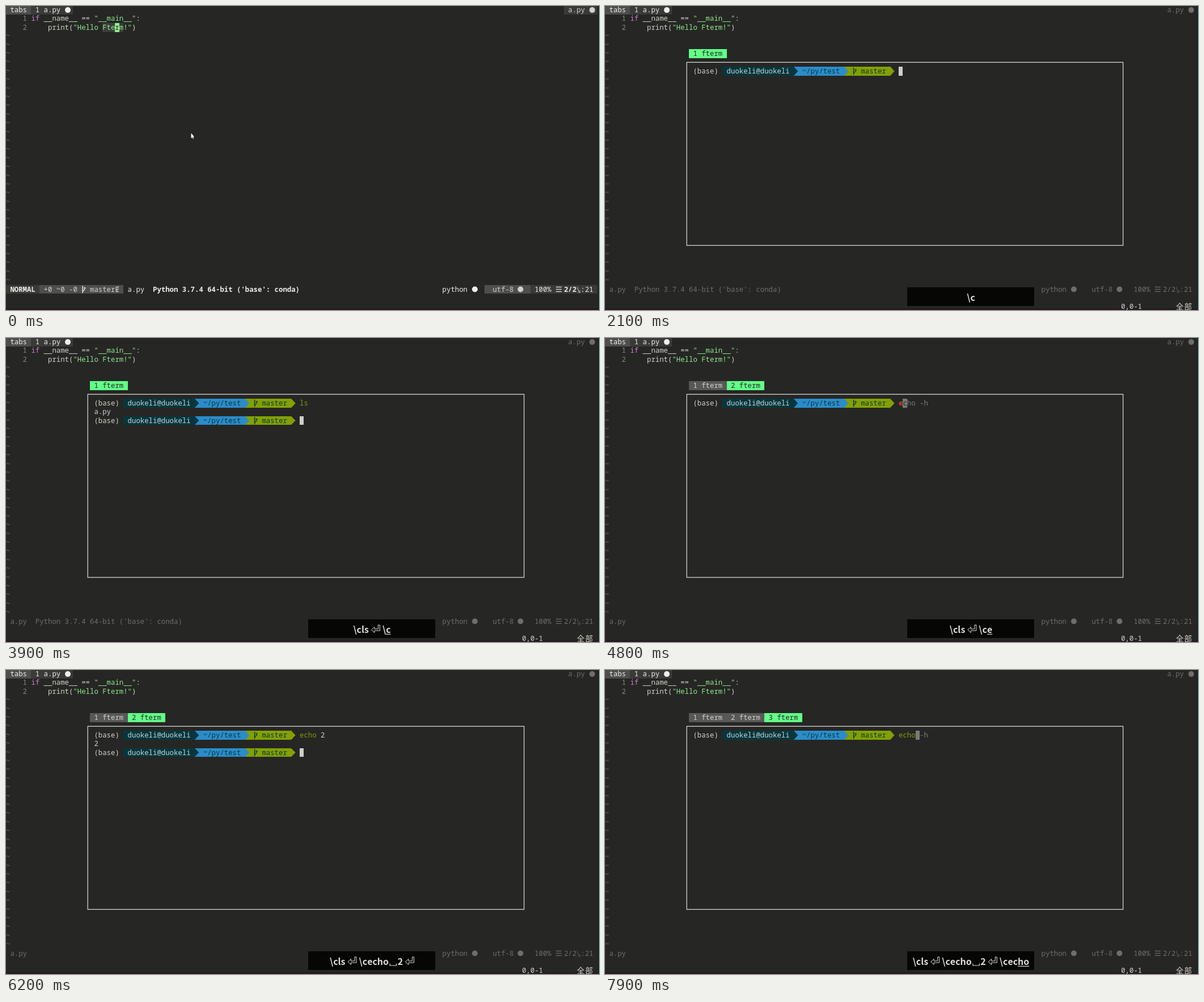
Recreate the animation shown at these times as an HTML page with a canvas. Size 1046 px wide and 536 px high, loop 8 s.

```html
<!DOCTYPE html>
<html lang="en">
<head>
<meta charset="utf-8">
<title>Floating terminal</title>
<style>
html, body { margin: 0; width: 100%; height: 100%; overflow: hidden; background: #262624; }
canvas { display: block; }
</style>
</head>
<body>
<canvas id="stage" width="1046" height="536"></canvas>
<script>
const ctx = document.getElementById('stage').getContext('2d');
const LOOP = 8000, CW = 7.4, RH = 15.39;
const MONO = '"Noto Sans Mono", "DejaVu Sans Mono", monospace';
const SANS = '"Noto Sans CJK SC", "Noto Sans", sans-serif';
const USER = 'duokeli@duokeli';
const C = {
  bg: '#262624', fg: '#d2d2cc', dim: '#6e6e6b', white: '#eeeeea', seg: '#3a3a39', segHi: '#4e4e4d',
  green: '#8fe88f', purple: '#c084c8', teal: '#07363e', blue: '#2b8cc9', lime: '#83a000',
  red: '#d8452f', tab: '#62ff87', tabOff: '#585857', hint: '#7a7a77'
};

// Font size at which one glyph advances exactly one cell
ctx.font = `100px ${MONO}`;
const SIZE = 100 * CW / ctx.measureText('M').width;

const X = col => col * CW;
const Y = row => row * RH - 0.5;

function rect(x, y, w, h, color) {
  ctx.fillStyle = color;
  ctx.fillRect(x, y, w, h);
}
function cells(col, row, count, color) {
  const x = Math.round(X(col)), y = Math.round(Y(row));
  rect(x, y, Math.round(X(col + count)) - x, Math.round(Y(row + 1)) - y, color);
}
function text(col, row, str, color, bold) {
  ctx.font = `${bold ? 'bold ' : ''}${SIZE}px ${MONO}`;
  ctx.fillStyle = color;
  [...str].forEach((ch, i) => ch !== ' ' && ctx.fillText(ch, X(col + i), Y(row) + 11.6));
}
function dot(x, row, color) {
  ctx.fillStyle = color;
  ctx.beginPath();
  ctx.arc(x, Y(row) + 7.6, 5, 0, 7);
  ctx.fill();
}
function line(points, color, width = 1, close = false) {
  ctx.strokeStyle = color;
  ctx.lineWidth = width;
  ctx.beginPath();
  points.forEach(([x, y]) => ctx.lineTo(x, y));
  if (close) ctx.closePath();
  ctx.stroke();
}
function arrow(col, row, color) {
  const x = X(col), y = Math.round(Y(row)), h = Math.round(Y(row + 1)) - y;
  ctx.fillStyle = color;
  ctx.beginPath();
  ctx.moveTo(x - 0.5, y);
  ctx.lineTo(x, y);
  ctx.lineTo(x + CW, y + h / 2);
  ctx.lineTo(x, y + h);
  ctx.lineTo(x - 0.5, y + h);
  ctx.fill();
}
function branch(col, row, color) {
  const x = X(col), y = Y(row);
  line([[x + 2, y + 1.5], [x + 2, y + 14]], color, 1.5);
  line([[x + 2, y + 11], [x + 5.6, y + 8], [x + 5.6, y + 4]], color, 1.3);
  line([[x + 3.8, y + 6], [x + 5.6, y + 3.8], [x + 7.2, y + 6]], color);
}

// Shell rows: a string is plain output, an object is a prompt with its command
const LS = { cmd: 'ls', ok: true };
const ECHO = { cmd: 'echo', ok: true, arg: ' 2' };
const typed = (cmd, hint, ok) => [{ cmd, hint, ok }];
const CAST = '\\cls⏎', CAST2 = CAST + '\\cecho␣2⏎';

const steps = [
  [0, { cursor: true, pointer: true, mark: true, showcmd: '', keys: '', under: 0, tabs: 0, term: [] }],
  [300, { cursor: false }],
  [500, { cursor: true, pointer: false, showcmd: '\\' }],
  [600, { keys: '\\', under: 1, showcmd: '\\c' }],
  [700, { keys: '\\c' }],
  [900, { under: 0 }],
  [1200, { cursor: false }],
  [1600, { showcmd: '' }],
  [1700, { tabs: 1, cursor: true, term: [''] }],
  [2000, { term: typed('') }],
  [2100, { mark: false }],
  [2300, { cursor: false }],
  [2500, { cursor: true, term: typed('l', 's') }],
  [2600, { keys: '\\cl', under: 1 }],
  [2700, { term: [LS] }],
  [2800, { keys: '\\cls', under: 2 }],
  [2900, { term: [LS, 'a.py', { cmd: '' }] }],
  [3000, { keys: CAST, under: 1 }],
  [3100, { under: 0 }],
  [3500, { cursor: false }],
  [3600, { keys: CAST + '\\', under: 1 }],
  [3800, { cursor: true }],
  [3900, { keys: CAST + '\\c' }],
  [4100, { tabs: 2, term: [''], under: 0 }],
  [4300, { term: typed('') }],
  [4500, { cursor: false }],
  [4800, { cursor: true, term: typed('e', 'cho -h'), keys: CAST + '\\ce', under: 1 }],
  [5000, { term: typed('ec', 'ho -h'), keys: CAST + '\\cec', under: 2 }],
  [5100, { term: typed('ech', 'o -h'), keys: CAST + '\\cech' }],
  [5200, { term: typed('echo', ' -h', true), keys: CAST + '\\cecho␣', under: 3 }],
  [5300, { under: 0 }],
  [5500, { term: typed('echo ', '-h', true) }],
  [5700, { term: [ECHO] }],
  [5800, { keys: CAST + '\\cecho␣2', under: 1 }],
  [6000, { term: [ECHO, '2', { cmd: '' }] }],
  [6100, { keys: CAST2 }],
  [6200, { under: 0 }],
  [6500, { keys: CAST2 + '\\', under: 1 }],
  [6600, { cursor: false }],
  [6700, { keys: CAST2 + '\\c' }],
  [7000, { tabs: 3, term: [''], cursor: true, under: 0 }],
  [7100, { term: typed('') }],
  [7400, { term: typed('e', 'cho -h') }],
  [7500, { keys: CAST2 + '\\ce', under: 1 }],
  [7600, { term: typed('ec', 'ho -h') }],
  [7700, { term: typed('ech', 'o -h'), keys: CAST2 + '\\cec', under: 2 }],
  [7800, { term: typed('echo', ' -h', true), keys: CAST2 + '\\cech' }],
  [7900, { keys: CAST2 + '\\cecho' }]
];
const stateAt = t => Object.assign({}, ...steps.filter(s => s[0] <= t).map(s => s[1]));

function drawEditor(s) {
  const active = !s.tabs;
  cells(0, 0, 6, C.segHi);
  cells(6, 0, 10, C.seg);
  text(1, 0, 'tabs', C.white);
  text(7, 0, '1 a.py', C.white);
  dot(109, 0, C.white);
  if (active) cells(133, 0, 8, C.seg);
  const side = active ? C.fg : C.dim;
  text(134, 0, 'a.py', side);
  dot(1034, 0, side);

  text(4, 1, '1', '#858580');
  text(4, 2, '2', '#858580');
  text(6, 1, 'if', C.purple);
  text(9, 1, '__name__ ==', C.fg);
  text(21, 1, '"__main__"', C.green);
  text(31, 1, ':', C.fg);
  if (s.mark) cells(23, 2, 5, '#3b3e3a');
  text(10, 2, 'print(', C.fg);
  text(16, 2, '"Hello Fterm!"', C.green);
  text(30, 2, ')', C.fg);
  if (active && s.cursor) {
    cells(26, 2, 1, '#8cf08c');
    text(26, 2, 'r', C.bg);
  }
  for (let row = 3; row < 32; row++) text(0, row, '~', '#66706c');
}

function drawStatus(s) {
  const row = 32, active = !s.tabs, fg = active ? C.white : C.dim;
  const env = "Python 3.7.4 64-bit ('base': conda)";
  if (active) {
    cells(0, row, 8, C.seg);
    cells(8, row, 20, C.segHi);
    cells(114, row, 11, C.segHi);
    cells(125, row, 16, C.seg);
    text(1, row, 'NORMAL', fg, true);
    text(9, row, '+0 ~0 -0', C.fg);
    branch(18, row, C.white);
    text(20, row, 'masterɆ', C.fg);
    text(29, row, 'a.py', fg);
    text(35, row, env, fg, true);
  } else {
    text(1, row, 'a.py', fg);
    if (s.tabs === 1) text(7, row, env, fg);
  }
  text(104, row, 'python', fg);
  dot(827, row, fg);
  text(116, row, 'utf-8', active ? C.fg : C.dim);
  dot(907.5, row, active ? C.fg : C.dim);
  text(126, row, '100%', fg);
  for (const y of [495.5, 499.5, 503.5]) line([[970, y], [980, y]], fg, 1.2);
  text(133, row, '2/2', fg, active);
  ctx.font = `7px ${MONO}`;
  ctx.fillText('L', 1007, 500);
  ctx.fillText('N', 1009, 506);
  text(137, row, ':21', fg);

  if (active) {
    text(130, 34, s.showcmd, C.fg);
  } else {
    text(123, 34, '0,0-1', C.fg);
    ctx.font = `13.4px ${SANS}`;
    ctx.fillText('全', X(136) + 0.5, 535);
    ctx.fillText('部', X(138) + 0.5, 535);
  }
}

function drawPrompt(row, { cmd, ok, arg = '', hint = '' }) {
  text(21, row, '(base)', C.fg);
  cells(28, row, 17, C.teal);
  cells(45, row, 12, C.blue);
  cells(57, row, 11, C.lime);
  arrow(45, row, C.teal);
  arrow(57, row, C.blue);
  arrow(68, row, C.lime);
  text(29, row, USER, '#c4d4d2');
  text(47, row, '~/py/test', C.teal);
  branch(59, row, C.teal);
  text(61, row, 'master', C.teal);
  text(70, row, cmd, ok ? C.lime : C.red, !ok);
  text(70 + cmd.length, row, arg, C.fg);
  const end = 70 + cmd.length + arg.length;
  text(end, row, hint, C.hint);
  return end;
}

function drawPopup(s) {
  for (let i = 0; i < s.tabs; i++) {
    const on = i === s.tabs - 1;
    cells(20 + i * 9, 5, 9, on ? C.tab : C.tabOff);
    text(21 + i * 9, 5, `${i + 1} fterm`, on ? C.bg : C.fg);
  }
  ctx.strokeStyle = '#d4d4d0';
  ctx.lineWidth = 1.3;
  ctx.strokeRect(144.2, 99.3, 769.6, 322.8);

  let row = 6, end = 21, last;
  for (last of s.term) {
    row++;
    if (typeof last === 'string') text(21, row, last, C.fg);
    else end = drawPrompt(row, last);
  }
  if (s.cursor) {
    const hint = last.hint || '';
    cells(end, row, 1, hint ? C.hint : '#cfcfca');
    if (hint) text(end, row, hint[0], C.bg);
  }
}

function drawKeys({ keys, under }) {
  if (!keys) return;
  rect(533, 496, 224, 33, '#060605');
  ctx.font = `bold 16px ${SANS}`;
  const chars = [...keys];
  const widths = chars.map((ch, i) =>
    ch === '⏎' ? (i < chars.length - 1 ? 24 : 20) :
    ch === '␣' ? 15.5 : ctx.measureText(ch).width);
  let x = 645.5 - widths.reduce((a, b) => a + b, 0) / 2;
  const ink = '#dededa';
  chars.forEach((ch, i) => {
    let from = x, width = widths[i];
    if (ch === '⏎') {
      from = x + 4;
      width = 16;
      line([[12.5, 506], [15.5, 506], [15.5, 516], [6, 516], [6, 519.5], [0.5, 514.5],
        [6, 509.5], [6, 513], [12.5, 513]].map(([px, py]) => [from + px, py]), ink, 1, true);
    } else if (ch === '␣') {
      line([[x + 2, 517.5], [x + 2, 521], [x + 13.5, 521], [x + 13.5, 517.5]], ink, 1.2);
    } else {
      ctx.fillStyle = ink;
      ctx.fillText(ch, x, 519.6);
    }
    if (i >= chars.length - under) rect(from, 521.7, width, 1.2, ink);
    x += widths[i];
  });
}

function drawPointer() {
  ctx.beginPath();
  [[326.5, 224], [326.5, 233.5], [328.7, 231.6], [330, 234.5], [331.3, 233.9], [330, 231], [332.2, 230.6]]
    .forEach(p => ctx.lineTo(...p));
  ctx.closePath();
  ctx.strokeStyle = '#111';
  ctx.lineWidth = 1.2;
  ctx.stroke();
  ctx.fillStyle = '#fff';
  ctx.fill();
}

function draw(now) {
  const s = stateAt(now % LOOP);
  rect(0, 0, 1046, 536, C.bg);
  rect(1044, 0, 2, 536, '#0a2b2b');
  rect(0, 533, 1046, 3, '#241b20');
  drawEditor(s);
  drawStatus(s);
  if (s.tabs) drawPopup(s);
  drawKeys(s);
  if (s.pointer) drawPointer();
}

const start = performance.now();
function tick() {
  draw(performance.now() - start);
  requestAnimationFrame(tick);
}
tick();
</script>
</body>
</html>
```
